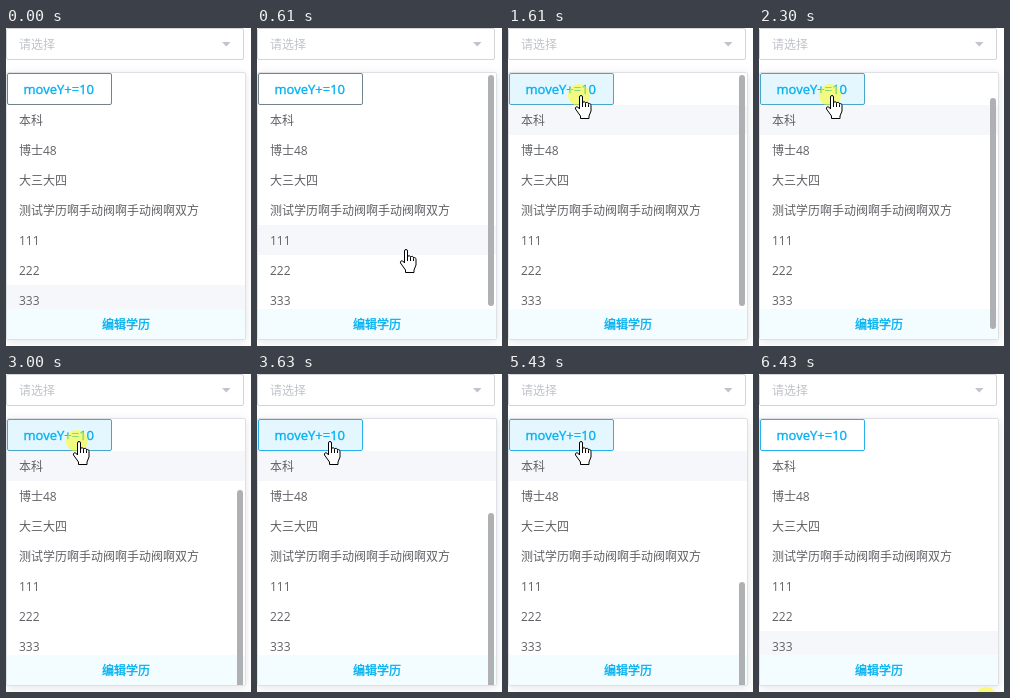
Animation of 245 by 318 pixels, one loop 6520 ms. Source, as an HTML page:

```html
<!DOCTYPE html>
<html lang="zh">
<meta charset="utf-8">
<style>
  html, body { margin: 0; width: 100%; height: 100%; overflow: hidden; background: #fff; }
  svg { display: block; }
  text { font: 12px "Open Sans", "Noto Sans CJK SC", "Noto Sans CJK", sans-serif; fill: #606266; }
  .accent { fill: #00b0f0; stroke: #00b0f0; stroke-width: .35; }
  #popup { filter: drop-shadow(0 2px 5px rgba(0, 0, 0, .1)); }
</style>
<svg width="245" height="318">
  <clipPath id="list"><rect x="1" y="77" width="238" height="204"/></clipPath>
  <clipPath id="inside"><rect x="1" y="45" width="238" height="266"/></clipPath>

  <rect x=".5" y=".5" width="237" height="31" rx="1.5" fill="#fff" stroke="#d3d5d9"/>
  <text x="13" y="21" style="fill:#c0c4cc">请选择</text>
  <path d="M216 14h8.500l-4.250 4.500z" fill="#c0c4cc"/>

  <rect id="popup" x=".5" y="44.5" width="239" height="267" rx="1.5" fill="#fff" stroke="#dde0e5"/>
  <g clip-path="url(#list)">
    <rect id="highlight" x="1" width="238" height="30" fill="#f5f7fa"/>
    <g id="rows"></g>
  </g>
  <rect x="1" y="281" width="238" height="30" fill="#f3fcff"/>
  <text class="accent" x="96" y="301">编辑学历</text>

  <rect id="button" x="1.5" y="45.5" width="104" height="31" rx="1.5"/>
  <text class="accent" x="17.5" y="66" style="font-size:13px">moveY+=10</text>

  <g clip-path="url(#inside)">
    <rect id="thumb" x="231" width="6" height="231" rx="3" fill="#afb0b1"/>
  </g>
  <circle id="press" r="11" fill="#ff0" fill-opacity=".5"/>
  <g id="hand" fill="#fff" stroke="#000" stroke-linejoin="round">
    <path d="M-.5 14V2a1.500 1.500 0 0 1 3 0v6a1.500 1.500 0 0 1 3 .5a1.500 1.500 0 0 1 3 .7a1.400 1.400 0 0 1 2.500 1V16l-2 5v2.500H.5V21l-5-7a1.600 1.600 0 0 1 2.300-2z"/>
    <path d="M2.500 8v4M5.500 8.500V12M8.500 9.500V12" fill="none"/>
  </g>
</svg>
<script>
  const LOOP = 6520, STEP = 77.5;
  const ENTER = 380, LEAVE = 5970, LAST_PRESS = 6430;
  const presses = [[1610, 1840], [2300, 2610], [2930, 3080], [3470, 3630],
                   [4020, 4180], [4570, 4720], [5270, 5430]];
  // Pointer stops: time, x, y
  const stops = [[380, 215, 275], [690, 125, 203], [770, 125, 203], [840, 121, 190],
                 [1220, 75, 80], [1460, 72, 67], [5430, 72, 67], [5890, 211, 300]];
  const $ = id => document.getElementById(id);
  const set = (id, attrs) => {
    for (const name in attrs) $(id).setAttribute(name, attrs[name]);
  };
  const clamp = (v, lo, hi) => Math.min(hi, Math.max(lo, v));
  // Elapsed time in whole screen updates
  const stepped = ms => Math.floor((ms + 8) / STEP) * STEP;

  const labels = ['本科', '博士48', '大三大四', '测试学历啊手动阀啊手动阀啊双方', '111', '222', '333'];
  $('rows').innerHTML = labels.map((s, i) => `<text x="13" y="${97 + 30 * i}">${s}</text>`).join('');

  function pointer(t) {
    const i = stops.findLastIndex(s => s[0] <= t);
    const a = stops[Math.max(i, 0)], b = stops[i + 1];
    if (i < 0 || !b) return a.slice(1);
    const p = clamp(stepped(t - a[0]) / (b[0] - a[0]), 0, 1);
    return [a[1] + (b[1] - a[1]) * p, a[2] + (b[2] - a[2]) * p];
  }

  function draw(t) {
    const [x, y] = pointer(t);
    const present = t >= ENTER && t < LEAVE;
    const hover = present && x < 106 && y < 77;
    const ended = t >= LAST_PRESS;
    const pressed = ended || presses.some(([down, up]) => t >= down && t < up);
    const scrolls = presses.filter(([, up]) => t >= up - 80).length;
    const border = hover && pressed ? '#4ba5cb' : hover || ended ? '#28b0ea' : '#73838b';

    set('highlight', { y: 77 + 30 * clamp(Math.floor((y - 77) / 30), 0, 6) });
    set('button', { fill: hover ? '#e5f7fe' : '#fff', stroke: border });
    set('thumb', {
      y: 47 + 23 * scrolls,
      opacity: present ? Math.min(1, (stepped(t - ENTER) + STEP) / 300) : 0
    });
    set('press', { cx: ended ? 227 : x - 1, cy: ended ? 324 : y, opacity: +pressed });
    set('hand', { transform: `translate(${Math.round(x)} ${Math.round(y)})`, opacity: +present });
  }

  const start = performance.now();
  (function frame() {
    draw((performance.now() - start) % LOOP);
    requestAnimationFrame(frame);
  })();
</script>
</html>
```
